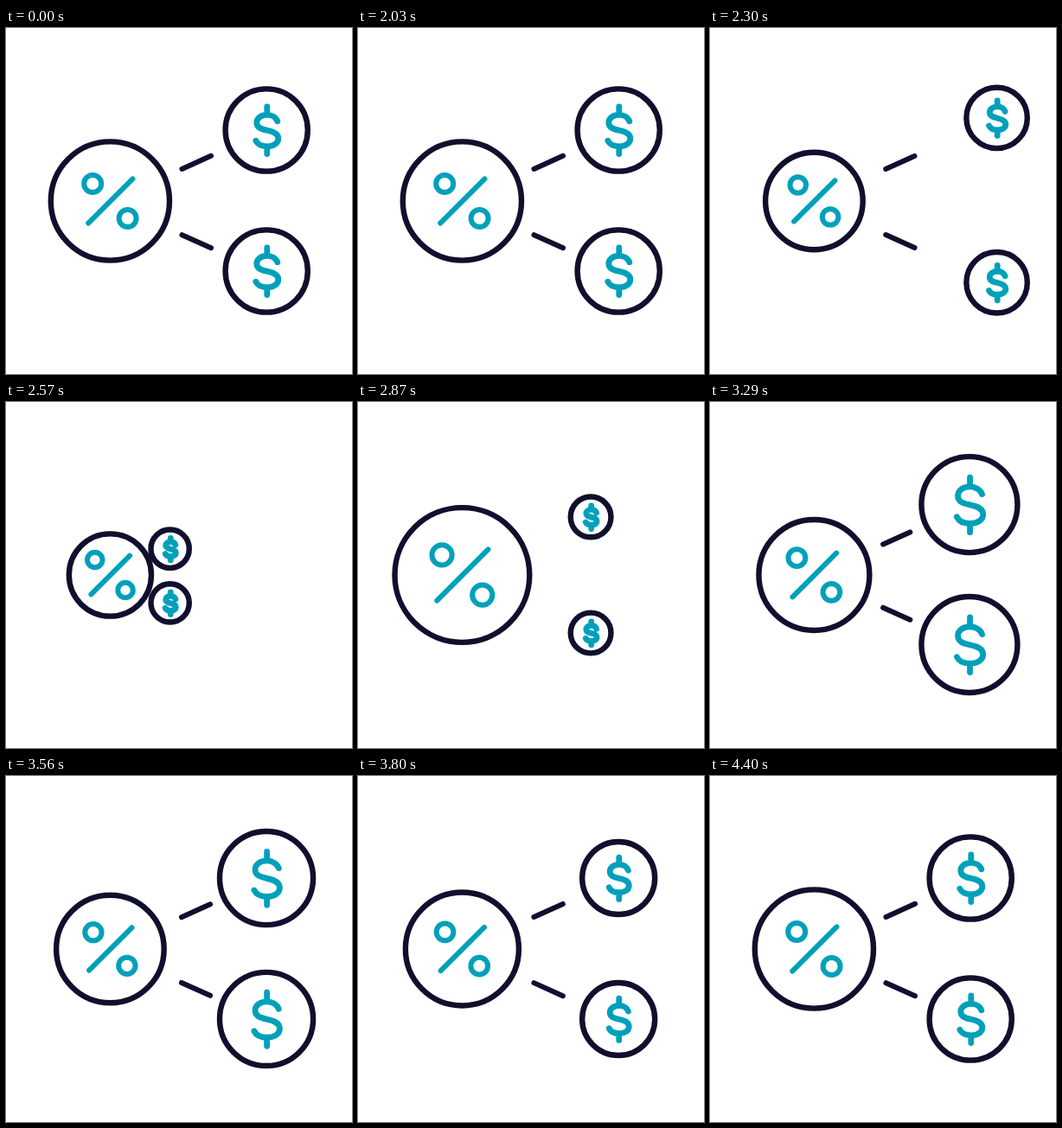
An HTML page that plays this animation: 400x400 px, repeating every 4460 ms.

```html
<!DOCTYPE html>
<html lang="en">
<head>
<meta charset="utf-8">
<title>Percent split</title>
<style>
  html, body { margin: 0; width: 100%; height: 100%; overflow: hidden; background: #fff; }
  svg { display: block; width: 100vw; height: 100vh; }
  svg * { vector-effect: non-scaling-stroke; }
  .ink, .teal { fill: none; stroke-width: 6; stroke-linecap: round; stroke-linejoin: round; }
  .ink { stroke: #100f2d; }
  .teal { stroke: #00a0bb; }
  circle.ink { stroke-width: 6.4; }
  #dollar { stroke-width: 6.8; }
  #hub { fill: #fff; }
</style>
</head>
<body>
<svg viewBox="0 0 400 400">
  <defs>
    <path id="dollar" d="M12 -10.5C10.5 -15 5.5 -18 0 -18C-7 -18 -12 -14 -12 -9
      C-12 -3 -6.5 -1.5 0 0C7 1.5 13 3.5 13 9.5C13 15 7.5 18.5 0 18.5
      C-6 18.5 -11 16 -13 12M0 -18V-27.3M0 18.5V27.3"/>
  </defs>
  <path id="linkTop" class="ink"/>
  <path id="linkLow" class="ink"/>
  <g id="coinTop"><circle class="ink"/><use href="#dollar" class="teal"/></g>
  <g id="coinLow"><circle class="ink"/><use href="#dollar" class="teal"/></g>
  <circle id="hub" class="ink" cx="120.4" cy="200"/>
  <g id="percent" class="teal">
    <circle cx="-20.2" cy="-20" r="10"/>
    <circle cx="20.2" cy="20" r="10"/>
    <path d="M-25.2 25.6L26 -25.6"/>
  </g>
</svg>
<script>
const LOOP = 4460, START = 2030, STEP = 30;
const HUB_R = 68.6, COIN_R = 47.6;
const $ = id => document.getElementById(id);
const clamp = u => Math.min(1, Math.max(0, u));
const smooth = u => u * u * (3 - 2 * u);
const mix = (a, b, u) => a + (b - a) * u;

// Swings from 1 through each [time, value] in turn, easing in and out.
function swing(t, ...stops) {
  let from = START, value = 1;
  for (const [to, next] of stops) {
    value = mix(value, next, smooth(clamp((t - from) / (to - from))));
    from = to;
  }
  return value;
}

// Backs off from 1 to the peak, falls to 0, then shoots back and settles at 1.
function leap(t, { peak, turn, hit, exit, tau }) {
  if (t > exit) return 1 - Math.exp((exit - t) / tau);
  if (t < turn) return mix(1, peak, smooth(clamp((t - START) / (turn - START))));
  return peak * (1 - clamp((t - turn) / (hit - turn)) ** 2);
}

const coinLeap = { peak: 1.22, turn: 2210, hit: 2645, exit: 2645, tau: 130 };
const linkLeap = { peak: 1.1, turn: 2210, hit: 2500, exit: 2890, tau: 150 };

function drawCoin(el, restY, go, scale) {
  const [ring, sign] = el.children;
  el.setAttribute('transform', `translate(${mix(120, 301.2, go)} ${mix(202, restY, go)})`);
  ring.setAttribute('r', COIN_R * scale);
  sign.setAttribute('transform', `translate(.6 .3) scale(${scale})`);
}

function drawLink(el, base, pitch, go) {
  const point = x => `${x} ${base + pitch * (x - 120)}`;
  el.setAttribute('d', `M${point(mix(155, 203.5, go))}L${point(mix(155, 237, go))}`);
  el.style.display = go > .02 ? '' : 'none';
}

function draw(time) {
  let t = time % LOOP;
  t = t < START ? 0 : START + Math.floor((t - START) / STEP) * STEP;

  const hub = swing(t, [2530, .68], [2930, 1.165], [3400, .895], [4130, 1]);
  const percent = swing(t, [2530, .865], [2930, 1.175], [3400, .96], [4130, 1]);
  const coin = swing(t, [2580, .465], [2830, .48], [3400, 1.24], [3860, .865], [4400, 1]);

  $('hub').setAttribute('r', HUB_R * hub);
  $('percent').setAttribute('transform', `translate(120.4 200) scale(${percent})`);

  const coinGo = leap(t, coinLeap), linkGo = leap(t, linkLeap);
  drawCoin($('coinTop'), 118, coinGo, coin);
  drawCoin($('coinLow'), 281, coinGo, coin);
  drawLink($('linkTop'), 200.5, -.45, linkGo);
  drawLink($('linkLow'), 201.6, .45, linkGo);
}

const begin = performance.now();
function frame() {
  draw(performance.now() - begin);
  requestAnimationFrame(frame);
}
frame();
</script>
</body>
</html>
```
